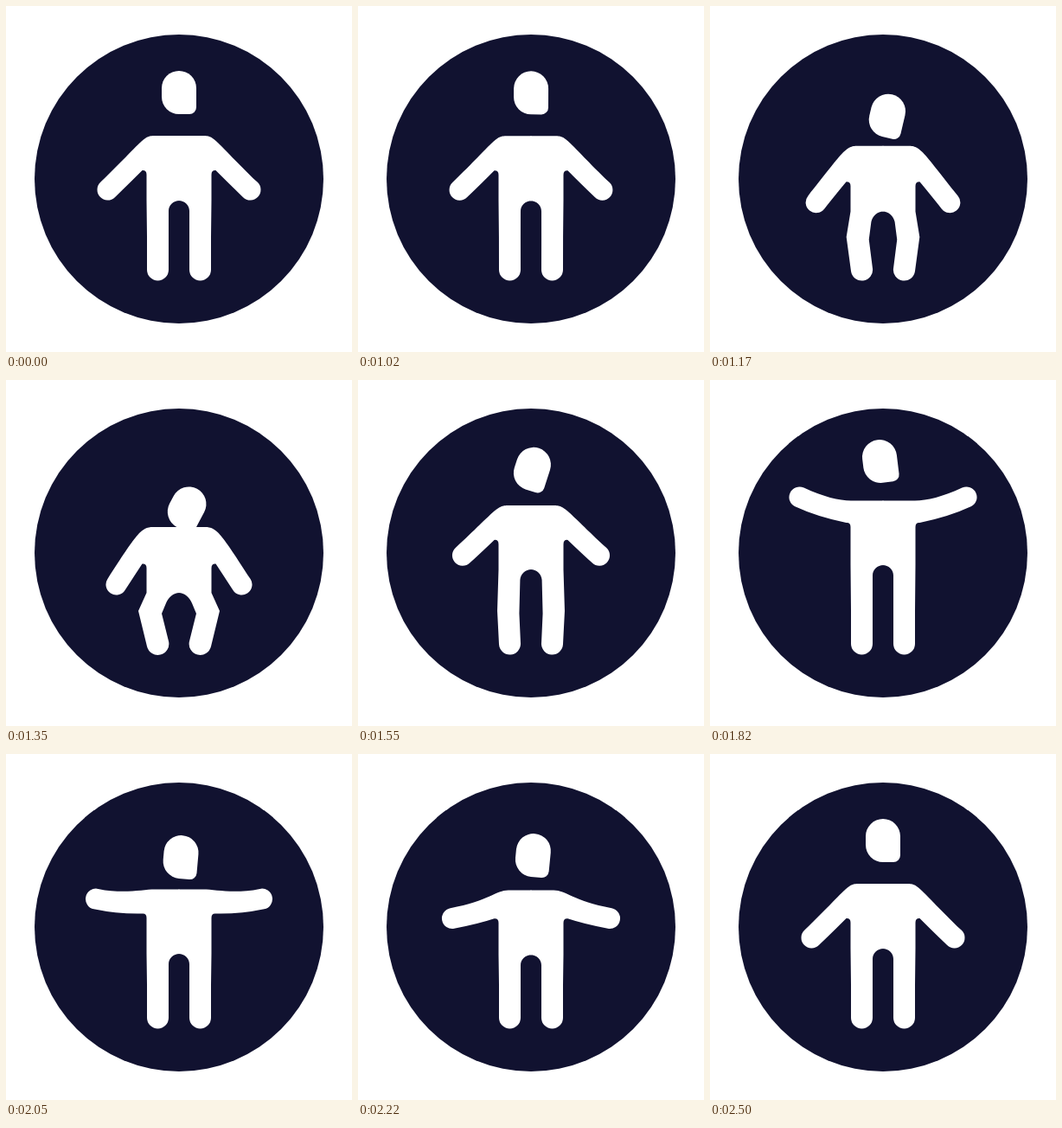
Recreate the animation shown at these times as an HTML page. Size 400 px wide and 400 px high, loop 2.52 s.

```html
<!DOCTYPE html>
<html lang="en">
<head>
<meta charset="utf-8">
<title>Jumping figure</title>
<style>
  html, body { margin: 0; height: 100%; overflow: hidden; background: #fff; }
  svg { display: block; width: 100%; height: 100%; }
</style>
</head>
<body>
<svg viewBox="0 0 400 400">
  <circle cx="200" cy="200" r="167" fill="#111230"/>
  <g fill="#fff">
    <path id="head" d="M-20 0a20 20 0 0 1 40 0V22a8 8 0 0 1-8 8H0a20 20 0 0 1-20-20z"/>
    <path id="half"/>
    <use href="#half" transform="matrix(-1 0 0 1 400 0)"/>
  </g>
</svg>
<script>
const LOOP = 2520;
const head = document.getElementById('head');
const half = document.getElementById('half');

// time, shoulder y, shoulder x, hand x, hand y, arm angle, arm reach,
// armpit y, crotch y, knee bend, head x, head y, head tilt
const rest = [150, 172, 117.5, 212.5, -44, 70, 190, 225, 0, 200, 95, 0];
const keys = [
  [1005, ...rest],
  [1350, 170, 170, 127.5, 236.5, -57, 62, 212.5, 246, 10, 211.5, 143.5, 28],
  [1550, 145, 174, 121, 203, -43, 65, 185, 219, 2, 203, 98, 18],
  [1820, 139.5, 163, 103.5, 135.5, 25, 25, 165, 214, 0, 196, 89, -7],
  [2050, 156.5, 172, 104, 167.5, 12, 30, 184.5, 231, 0, 202.5, 114, 5],
  [2510, ...rest],
];

const slope = (i, c) => (keys[i + 1][c] - keys[i][c]) / (keys[i + 1][0] - keys[i][0]);

// Time-weighted tangent, at rest on both ends
function tangent(i, c) {
  if (i === 0 || i === keys.length - 1) return 0;
  const before = keys[i][0] - keys[i - 1][0];
  const after = keys[i + 1][0] - keys[i][0];
  return (slope(i - 1, c) * after + slope(i, c) * before) / (before + after);
}

function poseAt(t) {
  if (t <= keys[0][0] || t >= keys[keys.length - 1][0]) return rest;
  const i = keys.findIndex(k => k[0] > t) - 1;
  const a = keys[i], b = keys[i + 1];
  const span = b[0] - a[0], u = (t - a[0]) / span, v = 1 - u;
  return rest.map((_, n) => {
    const c = n + 1;
    return a[c] * v * v * (1 + 2 * u) + b[c] * u * u * (3 - 2 * u)
      + span * u * v * (tangent(i, c) * v - tangent(i + 1, c) * u);
  });
}

function draw(t) {
  const [sy, sx, hx, hy, angle, reach, pit, crotch, bend, headX, headY, tilt] = poseAt(t);
  const b = Math.max(0, bend);
  const r = 12, rad = angle * Math.PI / 180;
  const dx = Math.cos(rad), dy = Math.sin(rad);
  const ox = hx + r * dy, oy = hy - r * dx;
  const ix = hx - r * dy, iy = hy + r * dx;

  half.setAttribute('d', `M200.5 ${sy}H${sx}
    C${sx - 14} ${sy} ${ox + reach * dx} ${oy + reach * dy} ${ox} ${oy}
    A${r} ${r} 0 0 0 ${ix} ${iy}
    Q${ix + 28 * dx} ${iy + 28 * dy} 157.5 ${pit}
    Q162.5 ${pit - 0.5} 162.5 ${pit + 5}
    V${crotch}L${163 - b} 267L163 ${305 + b * 0.3}
    A12.5 12.5 0 0 0 188 ${305 - b * 0.3}
    L${188 - b * 0.8} 270L${188 - b * 0.3} ${crotch + 12}
    C188 ${crotch + 5.4} 193.4 ${crotch} 200.5 ${crotch}Z`);
  head.setAttribute('transform', `translate(${headX} ${headY}) rotate(${tilt})`);
}

const start = performance.now();
function frame() {
  draw((performance.now() - start) % LOOP);
  requestAnimationFrame(frame);
}
frame();
</script>
</body>
</html>
```
